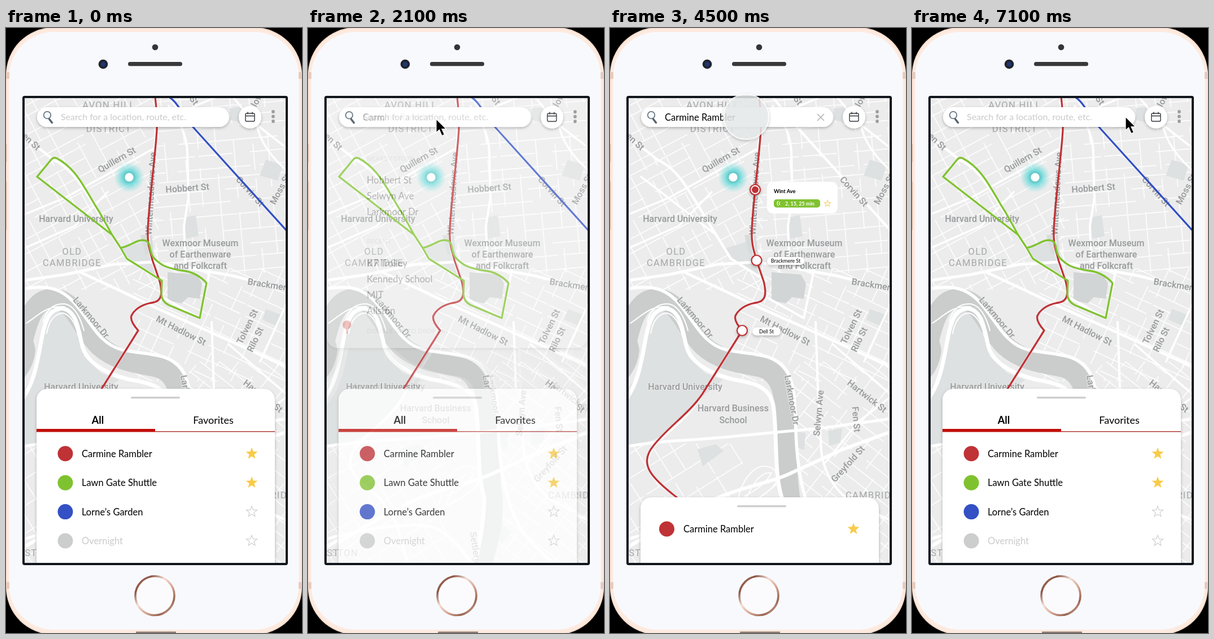
Animation of 524 by 1070 pixels, one loop 7800 ms. Source, as an HTML page:

```html
<!DOCTYPE html>
<html lang="en">
<head>
<meta charset="utf-8">
<title>Shuttle map</title>
<style>
html, body { margin: 0; width: 100%; height: 100%; overflow: hidden; background: #000; }
svg { display: block; }
text { font-family: Lato, sans-serif; white-space: pre; }
.map text { font-family: Roboto, sans-serif; font-weight: 500; fill: #989a9b; stroke: #ececec; stroke-width: 2px; paint-order: stroke; }
.map .area { font-weight: 400; fill: #a6a8a9; letter-spacing: 1.3px; }
.road { fill: none; stroke: #fff; stroke-linecap: round; stroke-linejoin: round; }
.route { fill: none; stroke-width: 3.3; stroke-linejoin: round; }
</style>
</head>
<body>
<svg id="stage" width="524" height="1070" viewBox="0 0 524 1070"></svg>
<script>
const RED = '#bf3236', GREEN = '#7fc22f', BLUE = '#3350c4', GOLD = '#f8cb48', PALE = '#cccdcd';
const LINE = 'Carmine Rambler';

let seed = 7;
const rnd = () => (seed = seed * 16807 % 2147483647) / 2147483647;

const rect = (x, y, w, h, r, fill, extra = '') =>
  `<rect x="${x}" y="${y}" width="${w}" height="${h}" rx="${r}" fill="${fill}" ${extra}/>`;
const disc = (x, y, r, fill, extra = '') => `<circle cx="${x}" cy="${y}" r="${r}" fill="${fill}" ${extra}/>`;
const path = (d, extra) => `<path d="${d}" ${extra}/>`;
const road = (d, w) => path(d, `class="road" stroke-width="${w}"`);
const text = (s, x, y, size, extra = '') => `<text x="${x}" y="${y}" font-size="${size}" ${extra}>${s}</text>`;
const shadow = 'filter="url(#soft)"';

function star(x, y, r, extra) {
  let pts = '';
  for (let i = 0; i < 10; i++) {
    const a = i * Math.PI / 5, q = i % 2 ? r * 0.42 : r;
    pts += `${(x + q * Math.sin(a)).toFixed(1)},${(y - q * Math.cos(a)).toFixed(1)} `;
  }
  return `<polygon points="${pts}" ${extra}/>`;
}
const gold = (x, y) => star(x, y, 11, `fill="${GOLD}"`);
const hollow = (x, y, r, color) => star(x, y, r, `fill="none" stroke="${color}" stroke-width="1.2"`);

// A patch of short parallel side streets in two directions
function streets(x, y, w, h, angle, gap) {
  const n = Math.hypot(w, h) / 2;
  let d = '';
  for (let v = -n; v < n; v += gap * (0.7 + rnd() * 0.6))
    for (let u = -n; u < n;) {
      const len = 50 + rnd() * 130;
      d += `M${u.toFixed(0)} ${v.toFixed(0)}h${len.toFixed(0)}`;
      u += len + rnd() * 45;
    }
  for (let u = -n; u < n; u += gap * (0.8 + rnd() * 0.8))
    for (let v = -n; v < n;) {
      const len = gap * (1 + Math.floor(rnd() * 4));
      d += `M${u.toFixed(0)} ${v.toFixed(0)}v${len.toFixed(0)}`;
      v += len + rnd() * 55;
    }
  return `<svg x="${x}" y="${y}" width="${w}" height="${h}" overflow="hidden">
    <path class="road" stroke-width="1.7" opacity=".9" d="${d}" transform="translate(${w / 2} ${h / 2}) rotate(${angle})"/></svg>`;
}

const label = ([s, x, y, a = 0, size = 16, extra = 'text-anchor="middle"']) =>
  `<text transform="translate(${x} ${y}) rotate(${a})" y="${size * 0.35}" font-size="${size}" ${extra}>${s}</text>`;
const area = (s, x, y, anchor = 'middle') => label([s, x, y, 0, 16.5, `class="area" text-anchor="${anchor}"`]);

function mapArt() {
  const park = (d, c = '#dee1e1') => path(d, `fill="${c}"`);
  const names = [
    ['Quillern St', 196, 233, -30], ['Hobbert St', 321, 283, -4], ['Wintermeadows Ave', 256, 293, -87],
    ['Corvin St', 432, 289, 48], ['Moss St', 485, 285, -62], ['ren St', 43, 199, 43], ['St', 333, 128, 55], ['low', 444, 127, -62],
    ['Harvard University', 124, 337], ['Wexmoor Museum', 344, 380], ['of Earthenware', 344, 400], ['and Folkcraft', 344, 420],
    ['Brackmere St', 428, 448, 9, 16, ''], ['Larkmoor Dr', 151, 512, 50], ['Mt Hadlow St', 310, 535, 27],
    ['Tolven St', 427, 528, -64], ['Rilo St', 441, 551, -64], ['Harvard University', 133, 634],
    ['Harvard Business', 218, 672], ['School', 218, 693], ['Larkmoor Dr', 322, 658, 80], ['Selwyn Ave', 369, 681, -85],
    ['Hartwick St', 455, 651, 38], ['Fen St', 436, 692, 85], ['Greyfold St', 421, 771, -48], ['Settlers Way', 284, 891, 81, 16, '']
  ];
  const river = 'M22 590C34 535 42 480 82 479C122 479 132 530 165 562C195 590 240 594 268 600C305 610 310 650 311 700C313 750 312 775 316 810C324 865 314 905 298 950';
  return rect(20, 118, 490, 840, 0, '#ececec')
    + streets(20, 118, 250, 345, -28, 23) + streets(262, 118, 240, 315, -5, 23)
    + streets(225, 425, 280, 200, 25, 23) + streets(325, 590, 180, 360, 38, 22) + streets(20, 735, 215, 215, -32, 34)
    + park('M20 660L56 600L68 515Q95 485 122 515L138 580L168 610L200 622L160 655L100 718L58 736L20 742Z')
    + park('M203 390L248 376L261 405L272 442L215 408Z') + park('M238 366h20l4 34h-16z', '#d8dcdb')
    + park('M286 432L338 436L347 452L343 479L322 476L311 487L286 482Z', '#d2d5d5')
    + park('M316 335l20-4l5 37l-23 5z') + park('M460 233l30 9l-9 28l-32-9z') + park('M460 497l30 11l-9 20l-27-12z')
    + park('M386 712l25-4l-3 25l-20 6z') + park('M328 714l18 2l-2 30l-15-4z') + park('M330 868l22 25l-20 22z')
    + park('M396 142l24-3l-5 28l-18-4z') + park('M155 745l32-9l14 12l-37 27z')
    + path(river, 'fill="none" stroke="#cbcdcd" stroke-width="36"')
    + park('M20 530Q48 535 52 570Q49 605 20 632Z', '#cbcdcd')
    + road('M20 464C75 450 103 463 125 491C152 523 165 558 205 569C250 579 290 573 312 605C330 632 327 680 330 735C334 795 345 845 370 888Q385 910 430 950', 5.5)
    + road('M20 668C52 630 55 590 64 545C70 515 78 496 100 496C124 500 128 531 134 558C140 592 178 612 220 622C260 628 287 637 290 675C296 730 291 790 304 830Q303 890 286 950', 7)
    + road('M66 520Q74 486 104 488Q126 492 138 535M72 540Q78 507 100 504Q120 508 128 545M36 522C56 510 70 490 104 493', 2)
    + road('M20 742C90 728 150 730 220 722L380 707L505 690', 5)
    + road('M20 925C80 890 130 858 190 831C240 810 290 803 325 785L410 746L505 711', 6)
    + road('M20 908Q95 882 165 880C230 872 250 906 285 950', 5)
    + road('M234 535L163 648C140 690 100 713 76 742C50 780 85 805 118 830L148 875L170 950', 4.5)
    + road('M225 840C235 790 262 765 288 779C312 798 278 828 242 840C205 860 238 885 250 920M232 850C250 812 264 783 286 787Q274 810 238 828M165 872Q250 850 300 802', 1.8)
    + road('M20 448L105 436L190 418L258 414L320 424L400 438L505 464', 5)
    + road('M132 432L205 466L270 497L340 528L400 555L505 603', 5)
    + road('M20 182L84 233C125 252 140 290 188 366L214 408L276 447', 4.5)
    + road('M264 120L268 160L252 345Q250 385 259 410L274 458', 5)
    + road('M286 120L330 174L500 362', 4.5)
    + road('M288 138Q320 180 321 220L323 300L315 350L318 425', 4)
    + road('M20 335L105 300L262 213M55 263L188 366M20 395L122 350L180 290', 3.5)
    + road('M330 140L382 118M400 120L440 168L500 215M448 120Q424 190 500 255', 3.5)
    + road('M275 475L343 513L362 424M364 520L368 640L374 748Q380 800 422 835L505 875', 4)
    + road('M380 770L440 696L505 646M395 560L505 655M450 590L500 480', 3.5)
    + names.map(label).join('')
    + area('AVON HILL', 182, 136) + area('DISTRICT', 182, 178) + area('OLD', 117, 395) + area('CAMBRIDGE', 117, 415)
    + area('CAMBRIDGE', 417, 826, 'start') + area('ALLSTON', 81, 928, 'end');
}

const redLine = path('M264 122Q268 150 267 180C265 220 252 320 251 358C250 385 256 396 259 410L272 448C278 472 275 484 258 486C238 489 226 500 222 509Q219 518 234 535L163 648C140 682 100 708 76 740C50 772 75 797 118 830L150 860', `class="route" stroke="${RED}"`);
const greenLine = path('M188 366L55 263L79 234Q84 227 91 231C128 251 143 292 165 325L188 366L203 389L214 408L276 447L275 471Q276 484 288 490L343 513L355 451C345 440 331 431 312 429C282 425 272 417 263 408C251 396 259 380 247 376C234 372 222 385 203 389', `class="route" stroke="${GREEN}"`);
const blueLine = path('M284 120C301 126 308 147 330 174L500 362', `class="route" stroke="${BLUE}"`);
const here = disc(218, 264, 27, 'url(#glow)') + disc(218, 264, 10.5, '#6bcac9') + disc(218, 264, 7.6, '#fff');

function searchBar(content, dx = 0, dy = 0) {
  const cal = 'fill="none" stroke="#30343a" stroke-width="1.4"';
  return `<g transform="translate(${dx} ${dy})">`
    + rect(55, 140, 340, 35, 17.5, '#fff', shadow)
    + path('M76.5 161L81.5 167.5', 'stroke="#56616b" stroke-width="3.4" stroke-linecap="round"')
    + disc(73, 154, 6.3, '#f7fbfd', 'stroke="#566777" stroke-width="1.6"')
    + disc(432, 157.5, 20, '#fff', shadow)
    + rect(424, 151, 16, 14, 2, 'none', cal) + path('M424 155.5h16M428 148.5v4M436 148.5v4', cal)
    + [148, 156.5, 165].map(y => disc(473, y, 2.9, '#9c9d9e')).join('')
    + content + '</g>';
}

const sheet = (y, hx) => rect(54, y, 422, 1000 - y, 20, '#fff', shadow) + rect(hx, y + 14, 87, 3.6, 1.8, '#cfcfcf');

function homeScreen() {
  const rows = [[LINE, RED, 1], ['Lawn Gate Shuttle', GREEN, 1], ['Lorne’s Garden', BLUE, 0], ['Overnight', PALE, 0]];
  return '<use href="#map"/>' + blueLine + redLine + greenLine + here
    + searchBar(text('Search for a location, route, etc.', 97, 163, 16, 'fill="#c9cacb"'))
    + sheet(638, 221)
    + text('All', 162.5, 700, 18, 'text-anchor="middle" font-weight="700"')
    + text('Favorites', 367, 700, 18, 'text-anchor="middle"')
    + rect(54, 709, 210, 5.5, 0, '#c10e08') + rect(264, 713, 212, 1.5, 0, '#b13a35')
    + rows.map(([name, color, fav], i) => {
        const y = 752.8 + i * 51.4;
        return disc(105, y, 13.5, color) + text(name, 134, y + 6, 16.5, `fill="${color === PALE ? '#cbcbcb' : '#000'}"`)
          + (fav ? gold(435, y) : hollow(435, y, 10, '#cfcfcf'));
      }).join('');
}

function searchScreen() {
  const head = (s, y) => text(s, 104, y, 11.4, 'font-weight="700" fill="#d0d1d1"');
  const list = (items, y) => items.map((s, i) => text(s, 104, y + i * 28, 16.5)).join('');
  return '<use href="#map" x="8"/>' + rect(33, 100, 462, 466, 20, '#fff', shadow)
    + searchBar(text(LINE.slice(0, 4) + `<tspan fill="#c8c9c9">${LINE.slice(4)}</tspan>`, 97.7, 163, 16.5), -0.7, 0.8)
    + head('NEARBY STOPS', 234.5) + list(['Hobbert St', 'Selwyn Ave', 'Larkmoor Dr'], 275)
    + head('RECENT', 381) + list(['K7 Trolley', 'Kennedy School', 'MIT', 'Allston'], 421.5)
    + rect(67.7, 528, 2.5, 13, 1, '#c10e08') + disc(69, 525, 7.8, '#c10e08')
    + head('DOUBLE TAP TO DROP PIN', 539.5);
}

function resultScreen() {
  const stop = (x, y) => disc(x, y, 9, '#fff', `stroke="${RED}" stroke-width="2.2" ${shadow}`);
  const tag = (s, x, y, w) => rect(x, y - 7, w, 14, 7, '#fff', shadow) + text(s, x + w / 2, y + 3.2, 9, 'text-anchor="middle"');
  return '<use href="#map"/>' + redLine + here
    + stop(257, 286) + disc(257, 286, 6, RED) + stop(259.5, 411) + stop(234, 535)
    + rect(278, 272, 125, 56, 10, '#fff') + text('Wint Ave', 290, 291.5, 9.3, 'font-weight="700"')
    + rect(290, 303, 82, 14.5, 5, GREEN) + text('2, 15, 25 min', 310, 313.6, 9, 'font-weight="700" fill="#fff"')
    + path('M298 306Q294 310 298 314.5M301 307.5Q298 310 301 313', 'fill="none" stroke="#fff" stroke-width="1.2"')
    + hollow(385, 310.5, 6, '#f0d67c')
    + tag('Brackmere St', 278, 412, 66) + tag('Dell St', 252, 536.5, 50)
    + searchBar(text(LINE, 97, 163.8, 16.5) + path('M367 152l12 12m0-12l-12 12', 'stroke="#b4b5b6" stroke-width="1.7"'))
    + sheet(830, 225) + disc(100.5, 886, 13.5, RED) + text(LINE, 130, 892, 16.5) + gold(431, 886);
}

const phone = rect(0, 0, 524, 1070, 0, '#000')
  + rect(0, -1, 524, 1074, 84, '#f6dccd') + rect(1.5, 1, 521, 1070, 83, '#fdeadf') + rect(5.5, 7, 513, 1057, 79, '#f8f9fd')
  + [78, 980].map(y => rect(0, y, 6, 12, 0, '#e8cbbd') + rect(518, y, 6, 12, 0, '#e8cbbd')).join('')
  + [[205, 32], [272, 20], [290, 67]].map(([y, h]) => rect(0, y, 1.2, h, 0, '#dcb6a3')).join('')
  + rect(230, 1067.5, 71, 3, 1, '#8d7a72')
  + disc(264, 34, 5.3, '#343536') + rect(216, 60, 96, 7.3, 3.6, '#39393a')
  + disc(172, 64, 8.3, '#20242e') + disc(172, 64, 4.2, '#20376f')
  + disc(263.5, 1004, 34.5, '#fbfbfe', 'stroke="url(#rose)" stroke-width="3.6"')
  + rect(29, 120, 470, 830, 4, '#11151c');

document.getElementById('stage').innerHTML = `<defs>
  <filter id="soft" x="-30%" y="-30%" width="160%" height="180%"><feDropShadow dx="0" dy="2" stdDeviation="2.5" flood-opacity=".27"/></filter>
  <radialGradient id="glow"><stop offset=".35" stop-color="#43cfd0" stop-opacity=".85"/><stop offset="1" stop-color="#6fe0e0" stop-opacity="0"/></radialGradient>
  <linearGradient id="rose" x1="0" y1="0" x2="1" y2="1"><stop offset="0" stop-color="#b57d69"/><stop offset=".2" stop-color="#8a5445"/><stop offset=".4" stop-color="#f5ded4"/><stop offset=".6" stop-color="#d9a793"/><stop offset=".8" stop-color="#9a6451"/><stop offset="1" stop-color="#f0cfc1"/></linearGradient>
  <clipPath id="screen"><rect x="33" y="124" width="462" height="822"/></clipPath>
  <g id="map" class="map">${mapArt()}</g></defs>${phone}
  <g clip-path="url(#screen)"><g>${homeScreen()}</g><g id="search">${searchScreen()}</g><g id="result">${resultScreen()}</g></g>
  <g id="touch">${disc(0, 0, 40, '#eaeded', `fill-opacity=".82" stroke="#fff" stroke-opacity=".75" stroke-width="2" ${shadow}`)}</g>
  <g id="arrow">${path('M0 0V24L5.5 19L10 29.5L14.5 27.5L10 17.5H17.5Z', 'stroke="#fff" stroke-width="1.2"')}</g>`;

const [search, result, touch, arrow] = ['search', 'result', 'touch', 'arrow'].map(id => document.getElementById(id));
// Each run: [end, [time, x, y], ...]
const touches = [
  [2000, [900, 270, 216], [1600, 227, 161]],
  [3200, [2800, 212, 161], [2900, 206, 157]],
  [6700, [4300, 212, 157], [4500, 241, 157], [5000, 133, 160], [5500, 367, 164], [5800, 432, 160], [6500, 378, 157]]
];
const arrows = [[2800, [2000, 227, 161]], [4300, [3200, 206, 157]], [7800, [6700, 378, 157]]];
const ramp = (t, a, b) => Math.min(1, Math.max(0, (t - a) / (b - a)));

function place(el, runs, t) {
  const run = runs.find(r => t >= r[1][0] && t < r[0]);
  el.style.display = run ? '' : 'none';
  if (!run) return;
  const keys = run.slice(1);
  let [, x, y] = keys[0];
  for (let i = 1; i < keys.length; i++) {
    const [a, x0, y0] = keys[i - 1], [b, x1, y1] = keys[i];
    if (t < a) break;
    const k = ramp(t, a, b), e = k * k * (3 - 2 * k);
    x = x0 + (x1 - x0) * e;
    y = y0 + (y1 - y0) * e;
  }
  el.setAttribute('transform', `translate(${x} ${y})`);
}

function fade(el, o) {
  el.style.display = o ? '' : 'none';
  el.setAttribute('opacity', o);
}

function draw(now) {
  const t = Math.floor(now % 7800 / 100) * 100;
  fade(search, t < 4100 ? ramp(t, 2000, 2400) : 0);
  fade(result, t < 6000 ? ramp(t, 3400, 4100) : 1 - ramp(t, 6700, 7100));
  place(touch, touches, t);
  place(arrow, arrows, t);
}

const start = performance.now();
function tick() {
  draw(performance.now() - start);
  requestAnimationFrame(tick);
}
tick();
</script>
</body>
</html>
```
